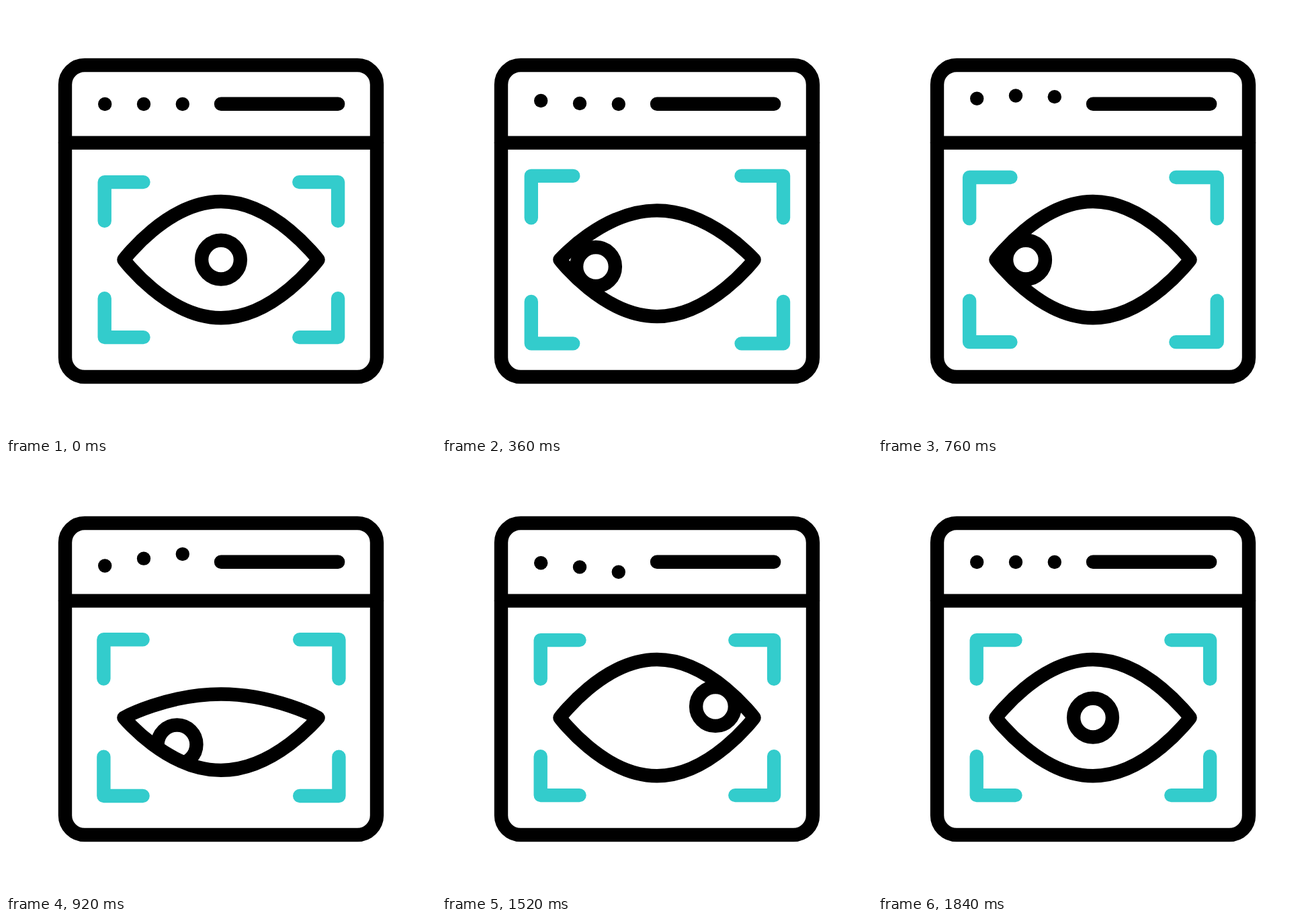
An HTML page for the animation above (1.88 s loop, 640x640 px).

```html
<!DOCTYPE html>
<html lang="en">
<head>
<meta charset="utf-8">
<title>Browser view</title>
<style>
  html, body { margin: 0; width: 100%; height: 100%; overflow: hidden; background: #fff; }
  svg { display: block; width: 100%; height: 100%; }
</style>
</head>
<body>
<svg viewBox="0 0 640 640" fill="none" stroke="#000" stroke-width="20.4" stroke-linecap="round" stroke-linejoin="round">
  <clipPath id="lens"><path id="lensShape"/></clipPath>
  <rect x="88" y="88" width="464" height="464" rx="29"/>
  <path d="M88 203.6H552M320 145.8H494.2"/>
  <g id="dots" fill="#000" stroke="none">
    <circle cx="147.2" r="10.2"/><circle cx="205" r="10.2"/><circle cx="262.8" r="10.2"/>
  </g>
  <path id="corners" stroke="#3cc"/>
  <g clip-path="url(#lens)"><circle id="pupil" r="28.9"/></g>
  <path id="eye"/>
</svg>
<script>
const LOOP = 1880, STEP = 40;
const CX = 320, CY = 377.6;
const $ = id => document.getElementById(id);
const dots = [...$('dots').children];
const ease = p => (1 - Math.cos(Math.PI * p)) / 2;

// Each key is [time, ...values]; values ease from key to key.
function track(keys, t) {
  if (t <= keys[0][0]) return keys[0].slice(1);
  const i = keys.findIndex(k => k[0] > t);
  if (i < 0) return keys[keys.length - 1].slice(1);
  const a = keys[i - 1], b = keys[i];
  const p = ease((t - a[0]) / (b[0] - a[0]));
  return a.slice(1).map((v, n) => v + (b[n + 1] - v) * p);
}

const dotKeys = [[150, 146], [635, 133.5], [1150, 164.3], [1595, 146]];
const zoomKeys = [[60, 1], [540, 1.116], [995, 1]];

// Pupil x, pupil y, upper lid y, lower lid y
const centre = [CX, CY, 291, 464.3];
const left = [220, CY, 291, 464.3];
const right = [407, 361, 291, 464.3];
const shut = [CX, 493, 440, 440];
const eyeKeys = [
  [80, ...centre], [235, ...shut], [390, ...left],
  [860, ...left], [1010, ...shut], [1160, ...right],
  [1540, ...right], [1690, ...shut], [1840, ...centre]
];

function corners(zoom) {
  let d = '';
  for (const sx of [-1, 1]) for (const sy of [-1, 1]) {
    const x = n => 320.4 + sx * n * zoom, y = n => CY + sy * n * zoom;
    d += `M${x(115.9)} ${y(115.5)}H${x(173.7)}V${y(57.7)}`;
  }
  return d;
}

function lens(top, bottom) {
  const [l, r] = [175.4, 464.6];
  return `M${l} ${CY}C${l} ${CY} 240 ${top} ${CX} ${top}S${r} ${CY} ${r} ${CY}` +
    `S400 ${bottom} ${CX} ${bottom}S${l} ${CY} ${l} ${CY}Z`;
}

function draw(now) {
  const t = Math.floor(now % LOOP / STEP) * STEP;
  dots.forEach((dot, i) => dot.setAttribute('cy', track(dotKeys, t - i * 120)[0]));
  $('corners').setAttribute('d', corners(track(zoomKeys, t)[0]));
  const [x, y, top, bottom] = track(eyeKeys, t);
  const shape = lens(top, bottom);
  $('eye').setAttribute('d', shape);
  $('lensShape').setAttribute('d', shape);
  $('pupil').setAttribute('cx', x);
  $('pupil').setAttribute('cy', y);
}

const start = performance.now();
function tick() {
  draw(performance.now() - start);
  requestAnimationFrame(tick);
}
tick();
</script>
</body>
</html>
```
